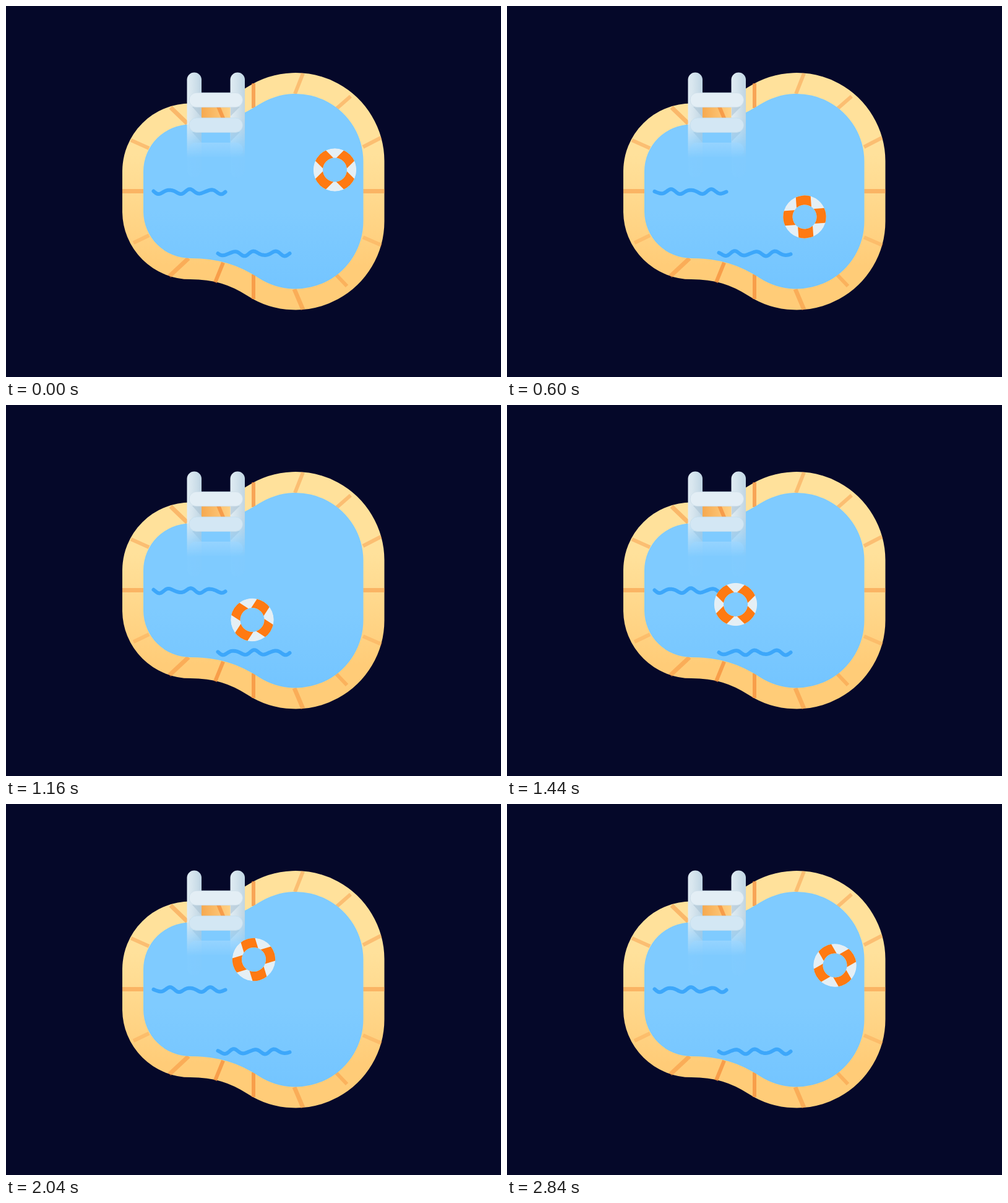
These frames come from a looping animation (800x600 px, 2.88 s). An HTML page:

```html
<!DOCTYPE html>
<html lang="en">
<head>
<meta charset="utf-8">
<title>Pool</title>
<style>
  html, body { margin: 0; width: 100%; height: 100%; overflow: hidden; background: #050829; }
  svg { display: block; width: 100vw; height: 100vh; }
</style>
</head>
<body>
<svg viewBox="0 0 800 600">
  <defs>
    <linearGradient id="stone" gradientUnits="userSpaceOnUse" x1="0" y1="240" x2="0" y2="420">
      <stop stop-color="#ffe19b"/><stop offset="1" stop-color="#ffcc78"/>
    </linearGradient>
    <linearGradient id="water" gradientUnits="userSpaceOnUse" x1="0" y1="330" x2="0" y2="458">
      <stop stop-color="#7fcbff"/><stop offset="1" stop-color="#74c5ff"/>
    </linearGradient>
    <linearGradient id="shade" gradientUnits="userSpaceOnUse" x1="316" y1="0" x2="363" y2="0">
      <stop stop-color="#f6a94f"/><stop offset="1" stop-color="#ffd286"/>
    </linearGradient>
    <linearGradient id="metal">
      <stop stop-color="#e0ecf3"/><stop offset=".4" stop-color="#d5e4ed"/><stop offset="1" stop-color="#bfd5e3"/>
    </linearGradient>
    <linearGradient id="sink" gradientUnits="userSpaceOnUse" x1="0" y1="170" x2="0" y2="278">
      <stop offset=".1" stop-color="#fff"/>
      <stop offset=".28" stop-color="#bbb"/>
      <stop offset=".48" stop-color="#666"/>
      <stop offset=".62" stop-color="#2a2a2a"/>
      <stop offset=".7" stop-color="#060606"/>
      <stop offset="1" stop-color="#050505"/>
    </linearGradient>
    <mask id="submerge" maskUnits="userSpaceOnUse" x="280" y="100" width="120" height="190">
      <rect x="280" y="100" width="120" height="190" fill="url(#sink)"/>
    </mask>
    <clipPath id="annulus">
      <path clip-rule="evenodd" d="M-34.7 0a34.7 34.7 0 1 0 69.4 0a34.7 34.7 0 1 0-69.4 0zM-19.5 0a19.5 19.5 0 1 0 39 0a19.5 19.5 0 1 0-39 0z"/>
    </clipPath>
    <path id="pool" d="M222 267A76 76 0 0 1 298 191.5C343 191.5 376 180.5 408.5 159.6A109.5 109.5 0 0 1 577.5 251V348A109.5 109.5 0 0 1 408.5 439.9C376 419 343 408 298 408A76 76 0 0 1 222 333Z"/>
  </defs>

  <rect width="800" height="600" fill="#050829"/>
  <use href="#pool" fill="none" stroke="url(#stone)" stroke-width="68"/>
  <path d="M316 160H363V192H316z" fill="url(#shade)"/>
  <g stroke="#f58a35" stroke-width="6">
    <path stroke-opacity=".4" d="M480 109L467 142M557 146L533 167M606 213L577 228M551 453L533 434M202 217L231 230"/>
    <path stroke-opacity=".28" d="M607 387L577 374M231 371L206 383"/>
    <path stroke-opacity=".48" stroke-width="7" d="M577 299.5H611.5M188 299.5H222M266 164L293 190M295 408L264 437M466 458L480 491"/>
    <path stroke-opacity=".68" d="M351 415L338 447M342 160L352 184M400 434V474M400 125V165"/>
  </g>
  <use href="#pool" fill="url(#water)"/>

  <g mask="url(#submerge)">
    <rect x="292.5" y="107.5" width="23.5" height="170" rx="11.7" fill="url(#metal)"/>
    <rect x="362.5" y="107.5" width="23.5" height="170" rx="11.7" fill="url(#metal)"/>
    <path fill="#a9c2d2" fill-opacity=".55" d="M301 163H316V180zM363 163H378L363 178zM301 204H316V221zM363 204H378L363 219z"/>
    <rect x="296" y="221" width="87" height="23" rx="11.5" fill="#cfeaff" fill-opacity=".7"/>
  </g>
  <g fill="#e3eef5" stroke="#cddfea" stroke-width=".8">
    <rect x="296" y="140.3" width="86.5" height="23.4" rx="11.7"/>
    <rect x="296" y="181" width="86.5" height="23.4" rx="11.7" fill="#d3e7f4" stroke="#c3ddee"/>
  </g>

  <g fill="none" stroke="#3da7fa" stroke-width="6" stroke-linecap="round" stroke-linejoin="round">
    <path id="upper"/><path id="lower"/>
  </g>

  <g id="ring" clip-path="url(#annulus)">
    <circle r="35" fill="#e5eff5"/>
    <path d="M-27-27L27 27M-27 27L27-27" stroke="#ff7a12" stroke-width="24"/>
  </g>
</svg>
<script>
  const LOOP = 2880, STEP = 40;
  const byId = id => document.getElementById(id);

  // [time, x, y]
  const route = [
    [0, 531.5, 265], [320, 514.5, 308.5], [600, 481, 341], [850, 440, 354],
    [1160, 398, 347.5], [1440, 369.5, 322.5], [1680, 374, 291], [2040, 400.5, 251.5],
    [2240, 432, 239], [2520, 479, 243], [2840, 530, 261]
  ];
  // [time, degrees]
  const spin = [[0, 0], [600, 41], [1160, 78], [1440, 180], [2040, 208], [2520, 293], [2840, 285]];

  function segment(keys, t) {
    let i = 0;
    while (i < keys.length - 2 && t >= keys[i + 1][0]) i++;
    return i;
  }

  function slope(keys, i, axis) {
    const a = keys[Math.max(i - 1, 0)], b = keys[Math.min(i + 1, keys.length - 1)];
    return (b[axis] - a[axis]) / (b[0] - a[0]);
  }

  function smooth(keys, t, axis) {
    const i = segment(keys, t), a = keys[i], b = keys[i + 1];
    const span = b[0] - a[0], u = (t - a[0]) / span, v = 1 - u;
    return a[axis] * v * v * (1 + 2 * u) + b[axis] * u * u * (3 - 2 * u)
      + span * u * v * (slope(keys, i, axis) * v - slope(keys, i + 1, axis) * u);
  }

  function linear(keys, t) {
    const i = segment(keys, t), a = keys[i], b = keys[i + 1];
    return a[1] + (b[1] - a[1]) * (t - a[0]) / (b[0] - a[0]);
  }

  function wave(left, middle, phase) {
    const points = [];
    for (let x = 0; x <= 116; x += 2) {
      const swell = 3.4 * Math.cos((x - 26) * 2 * Math.PI / 33);
      const ripple = 0.8 * Math.sin(x * 2 * Math.PI / 21 + phase);
      points.push(`${left + x} ${(middle - swell + ripple).toFixed(2)}`);
    }
    return "M" + points.join("L");
  }

  function draw(now) {
    const t = Math.floor(now % LOOP / STEP) * STEP;
    const phase = t / LOOP * 4 * Math.PI;
    byId("upper").setAttribute("d", wave(238.5, 300.3, phase));
    byId("lower").setAttribute("d", wave(342.5, 400.3, phase + 1));
    byId("ring").setAttribute("transform",
      `translate(${smooth(route, t, 1)} ${smooth(route, t, 2)}) rotate(${linear(spin, t)})`);
  }

  const start = performance.now();
  function tick() {
    draw(performance.now() - start);
    requestAnimationFrame(tick);
  }
  tick();
</script>
</body>
</html>
```
